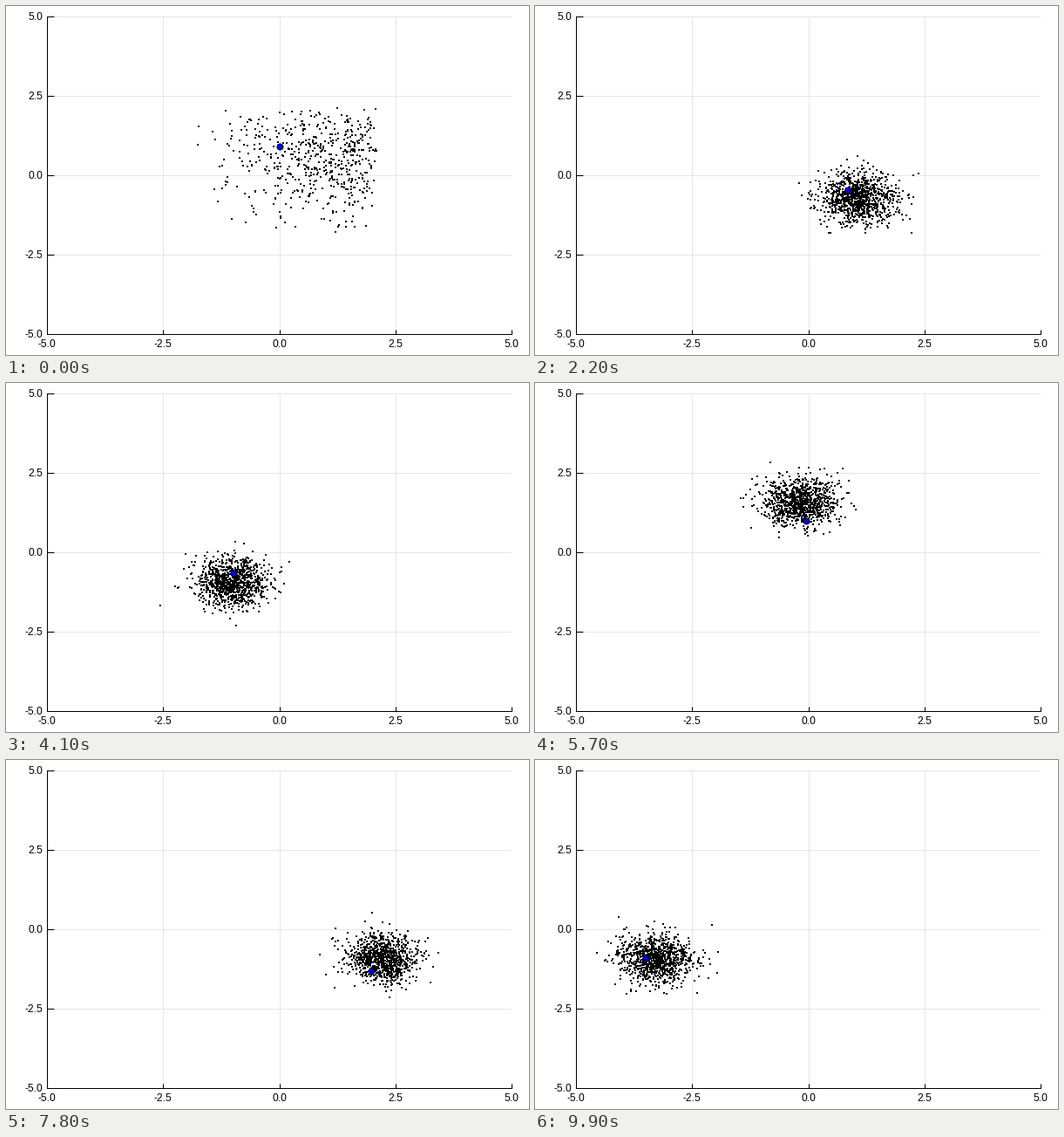
Recreate the animation shown at these times as a matplotlib script. Size 600x400 px, loop 10000 ms.

```python
import matplotlib.pyplot as plt
import numpy as np
from matplotlib.animation import FuncAnimation

W, H, DPI = 600, 400, 100
FRAMES, INTERVAL = 100, 100
PX = 72 / DPI  # one pixel in points
COUNT = 1000
DELAY = 2      # steps by which the estimate trails the body

# step, position and velocity, with x + iy as complex numbers
KEYS = [
    (0, 0.9j, 0),
    (8, 0.95 + 0.8j, 0),
    (22, 0.85 - 0.48j, -0.11 + 0.15j),
    (41, -0.98 - 0.65j, 0.02 + 0.15j),
    (57, -0.05 + 1j, 0.05 - 0.32j),
    (78, 1.97 - 1.33j, -0.14 - 0.24j),
    (88, 0.1 - 1.3j, -0.3 + 0.05j),
    (99, -3.5 - 0.92j, -0.06),
]


def route():
    """Cubic Hermite curve through the keys, one x, y row per step."""
    z = np.zeros(FRAMES, complex)
    for (t0, p0, v0), (t1, p1, v1) in zip(KEYS, KEYS[1:]):
        h = t1 - t0
        u = np.arange(h + 1) / h
        ease = u * u * (3 - 2 * u)
        z[t0:t1 + 1] = (p0 + (p1 - p0) * ease
                        + h * u * (1 - u) * (v0 * (1 - u) - v1 * u))
    return np.column_stack([z.real, z.imag])


def run_filter(centre, rng):
    """Particle clouds for every step: drift, diffuse, weigh, resample."""
    seeds = np.column_stack([-2.1 + 4.2 * rng.beta(3.1, 1.5, 560),
                             -2.2 + 4.35 * rng.beta(2.8, 1.8, 560)])
    seeds += rng.normal(0, 0.04, seeds.shape)
    clouds = [seeds]
    p = seeds[rng.integers(0, len(seeds), COUNT)]
    for k in range(1, FRAMES):
        p = p + rng.normal(0, 0.2, p.shape)
        p += centre[k] - p.mean(axis=0)
        clouds.append(p)
        spread = 0.4 + 1.5 * np.exp(-k / 8)
        weight = np.exp(-((p - centre[k]) ** 2).sum(axis=1) / (2 * spread))
        p = p[rng.choice(COUNT, COUNT, p=weight / weight.sum())]
    return clouds


body = route()
start_bias = np.outer(np.exp(-np.arange(FRAMES) / 3), [0.8, -0.4])
estimate = body - DELAY * np.gradient(body, axis=0) + start_bias
clouds = run_filter(estimate, np.random.default_rng(7))

plt.rcParams["font.family"] = "Liberation Sans"
fig = plt.figure(figsize=(W / DPI, H / DPI), dpi=DPI, facecolor="white")
ax = fig.add_axes([47 / W, 1 - 376 / H, 533 / W, 364 / H])
ticks = np.linspace(-5, 5, 5)
ax.set(xlim=(-5, 5), ylim=(-5, 5), xticks=ticks, yticks=ticks)
for axis in (ax.xaxis, ax.yaxis):
    axis.set_major_formatter(plt.FormatStrFormatter("%.1f"))
ax.tick_params(direction="in", width=PX, labelsize=12 * PX)
ax.tick_params(axis="x", length=5 * PX, pad=6 * PX)
ax.tick_params(axis="y", length=8 * PX, pad=5 * PX)
ax.grid(color="#e6e6e6", linewidth=PX)
ax.set_axisbelow(True)
ax.spines[["top", "right"]].set_visible(False)
ax.spines[["left", "bottom"]].set_linewidth(PX)

dots, = ax.plot([], [], "s", color="black", markersize=2.5 * PX, markeredgewidth=0)
marker, = ax.plot([], [], "o", color="blue", markersize=7 * PX,
                  markeredgecolor="black", markeredgewidth=PX)


def draw(k):
    dots.set_data(*clouds[k].T)
    marker.set_data(*body[k:k + 1].T)
    return dots, marker


anim = FuncAnimation(fig, draw, frames=FRAMES, interval=INTERVAL,
                     repeat=True, repeat_delay=0)
plt.show()
```
